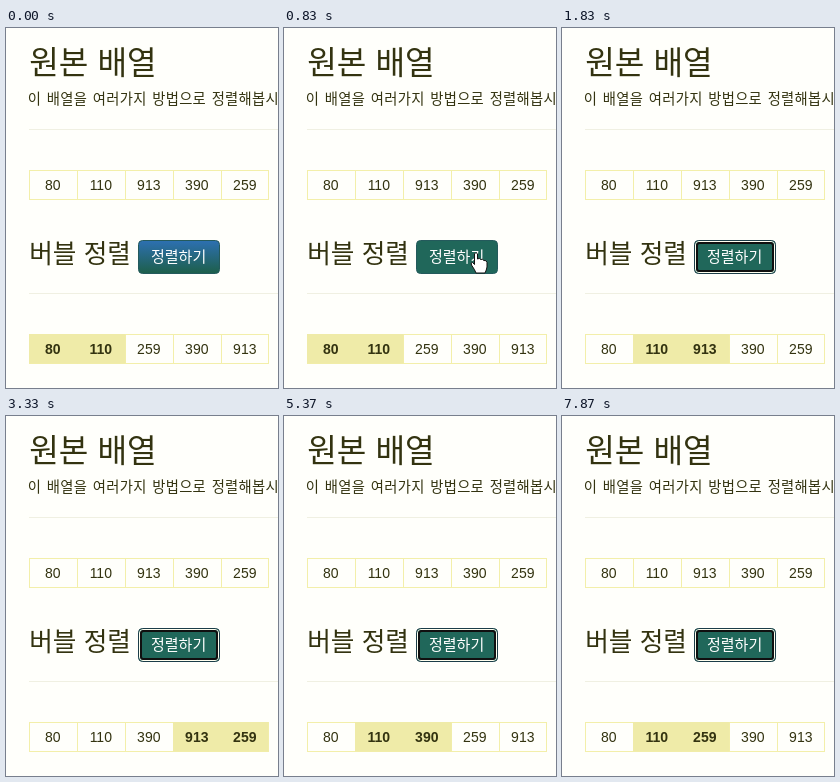
An HTML page that plays this animation: 272 by 360 pixels, repeating every 8000 ms.

```html
<!DOCTYPE html>
<html lang="ko">
<head>
<meta charset="utf-8">
<title>버블 정렬</title>
<style>
html, body { margin: 0; width: 100%; height: 100%; overflow: hidden; background: #fffffb; }
svg { display: block; width: 272px; height: 360px; }
text { fill: #333310; font-family: "Noto Sans CJK KR", "Noto Sans CJK", sans-serif; }
.num { font: 14px "Liberation Sans", Arial, sans-serif; text-anchor: middle; }
.bold { font-weight: bold; }
.head { font-weight: 300; }
.label { font-size: 15px; fill: #fff; font-weight: 300; }
.lead { font-size: 14.3px; letter-spacing: .3px; word-spacing: 1.3px; font-weight: 300; }
</style>
</head>
<body>
<svg id="stage" viewBox="0 0 272 360">
  <defs>
    <linearGradient id="blue" x1="0" y1="0" x2="0" y2="1">
      <stop offset="0" stop-color="#2d70b2"/>
      <stop offset="1" stop-color="#1d5f4a"/>
    </linearGradient>
  </defs>
</svg>
<script>
const NS = 'http://www.w3.org/2000/svg';
const LOOP = 8000, CLICK = 870, START = 1370, STEP = 500;
const INPUT = [80, 110, 913, 390, 259];
const LEFT = 23, CELL = 48, RIGHT = 262;
const stage = document.getElementById('stage');

function add(parent, tag, attrs, text) {
  const el = document.createElementNS(NS, tag);
  for (const k in attrs) el.setAttribute(k, attrs[k]);
  if (text !== undefined) el.textContent = text;
  parent.appendChild(el);
  return el;
}

const show = (el, on) => el.setAttribute('visibility', on ? 'visible' : 'hidden');

function rule(y) {
  add(stage, 'rect', { x: LEFT, y, width: 249, height: 1, fill: '#f0f0e2' });
}

function makeRow(y) {
  const group = add(stage, 'g', {});
  const cells = INPUT.map((n, i) => {
    const x = LEFT + i * CELL, width = Math.min(x + CELL, RIGHT) - x;
    add(group, 'rect', { x: x + .5, y: y + .5, width, height: 29, fill: 'none', stroke: '#f3efaa' });
    return { x, n, width };
  });
  for (const c of cells) {
    c.fill = add(group, 'rect', { x: c.x, y, width: c.width + .5, height: 29.5, fill: '#efeba8' });
    show(c.fill, false);
  }
  for (const c of cells) {
    c.text = add(group, 'text', { x: c.x + 23.8, y: y + 20, class: 'num' }, c.n);
  }
  return { group, cells };
}

function makeSection(title, y) {
  const g = add(stage, 'g', { transform: `translate(0 ${y})` });
  add(g, 'text', { x: 23.2, y: 23, 'font-size': 25.7, class: 'head' }, title);
  const face = add(g, 'rect', { x: 132.5, y: .5, width: 81, height: 33, rx: 4, fill: 'url(#blue)', stroke: '#245a5c' });
  const ring = add(g, 'g', { fill: 'none' });
  add(ring, 'rect', { x: 133.5, y: 1.5, width: 79, height: 31, rx: 3.5, stroke: '#fffff0' });
  add(ring, 'rect', { x: 135, y: 3, width: 76, height: 28, rx: 2.5, stroke: '#101010', 'stroke-width': 2 });
  show(ring, false);
  add(g, 'text', { x: 145, y: 22, class: 'label' }, '정렬하기');
  return { g, face, ring };
}

// Every picture the sort shows: the values and the first compared position
function sortSteps(input) {
  const a = input.slice(), steps = [];
  for (let i = 0; i < a.length; i++) {
    for (let j = 0; j < a.length - i; j++) {
      steps.push({ a: a.slice(), j });
      if (a[j] > a[j + 1]) {
        [a[j], a[j + 1]] = [a[j + 1], a[j]];
        steps.push({ a: a.slice(), j });
      }
    }
  }
  return steps;
}

add(stage, 'text', { x: 23.2, y: 46, 'font-size': 32.2, class: 'head' }, '원본 배열');
add(stage, 'text', { x: 21.8, y: 76, class: 'lead' }, '이 배열을 여러가지 방법으로 정렬해봅시다');
rule(101);
makeRow(142);
const bubble = makeSection('버블 정렬', 212);
rule(265);
const row = makeRow(306);
const next = makeSection('삽입 정렬', 346);

const ink = { fill: '#fff', stroke: '#111', 'stroke-linejoin': 'round' };
const arrow = add(stage, 'path', { ...ink, d: 'M.5 .5V16.5L4.3 13L7 19L9.6 17.9L7 12H12Z' });
const hand = add(stage, 'path', {
  ...ink,
  d: 'M-1.5 2Q0 -1 1.5 2V7Q3.5 5.5 4.7 7.5Q6.5 6.5 7.8 8.5Q10.5 7.8 11 10.5V15Q10.5 18 9 21H0Q-1 18 -4.5 13Q-5.5 10.5 -3.5 10.5L-1.5 12.5Z'
});

const steps = sortSteps(INPUT);
const sorted = { a: INPUT.slice().sort((x, y) => x - y), j: 0 };

// Pointer way: time, x, y
const path = [[30, 0, 272], [470, 179, 251], [830, 192, 224],
  [1040, 192, 224], [1100, 219, 250], [1130, 219, 250]];

function cursorAt(t) {
  const i = path.findIndex(p => p[0] > t);
  if (i < 1) return null;
  const [t0, x0, y0] = path[i - 1], [t1, x1, y1] = path[i];
  const k = (t - t0) / (t1 - t0);
  return [x0 + (x1 - x0) * k, y0 + (y1 - y0) * k].map(Math.round);
}

function stepAt(t) {
  if (t < CLICK) return sorted;
  if (t < START) return null;
  return steps[Math.floor((t - START + 40) / STEP)];
}

function draw(t) {
  const step = stepAt(t), pos = cursorAt(t);
  show(row.group, step);
  show(next.g, !step);
  row.cells.forEach((c, i) => {
    const on = !!step && (i === step.j || i === step.j + 1);
    show(c.fill, on);
    if (step) c.text.textContent = step.a[i];
    c.text.classList.toggle('bold', on);
  });
  const focus = t >= CLICK;
  const hover = pos && pos[1] < 246 && pos[0] > 132 && pos[0] < 214;
  bubble.face.setAttribute('fill', focus || hover ? '#20675a' : 'url(#blue)');
  bubble.face.setAttribute('stroke', focus ? '#1b3d48' : '#245a5c');
  show(bubble.ring, focus);
  show(arrow, pos && !hover);
  show(hand, hover);
  if (pos) for (const el of [arrow, hand]) el.setAttribute('transform', `translate(${pos})`);
}

const origin = performance.now();
function tick(now) {
  draw(Math.max(0, now - origin) % LOOP);
  requestAnimationFrame(tick);
}
draw(0);
requestAnimationFrame(tick);
</script>
</body>
</html>
```
